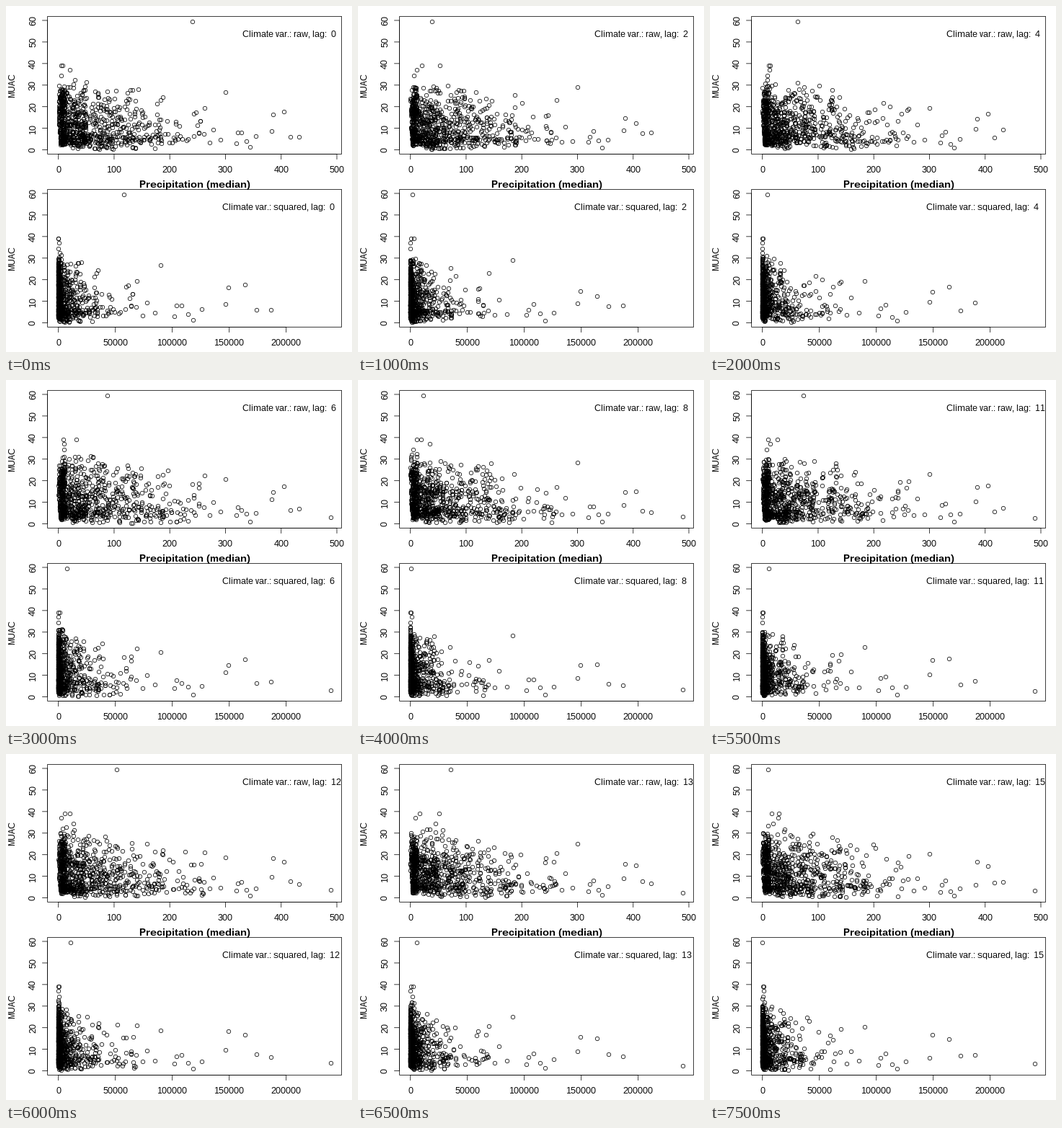
Animation of 480 by 480 pixels, one loop 8000 ms. Source, as a matplotlib script:

```python
import numpy as np
import matplotlib.pyplot as plt
from matplotlib.animation import FuncAnimation
from matplotlib.markers import MarkerStyle
from matplotlib.patches import Rectangle
from matplotlib.transforms import Affine2D

SIZE, DPI = 480, 80
PX = 72 / DPI  # points per pixel
LAGS, STEP = 16, 500
LINE, RING = 0.75, 5.4  # stroke and circle diameter in pixels

plt.rcParams.update({
    "font.family": "Liberation Sans",
    "text.hinting": "native",
    "text.hinting_factor": 1,
})

# Rainfall quantiles of the dense part
RANK = [0, 0.33, 0.63, 0.79, 0.91, 0.97, 1]
RAIN = [0, 12, 50, 92, 145, 190, 260]
COUNT = 830

# Wettest months with their usual MUAC
TAIL = np.array([
    (489, 3.1), (432, 7.2), (417, 6.7), (404.5, 16), (386, 15), (383, 9),
    (355, 4.8), (344, 1.2), (337, 3.9), (329, 8), (321.5, 7), (319.5, 3.5),
    (300, 24), (291, 4.8), (278.5, 10), (272, 4), (262, 20), (261, 7),
    (252, 8), (243.5, 16),
])

# The single highest value drifts between these rainfalls
TOP_LAG = [0, 2, 6, 8, 10, 12, 15]
TOP_X = [240, 39, 88, 23, 42, 104, 10]


def cloud(rng):
    x = np.interp(rng.random(COUNT), RANK, RAIN)
    dry = x < 12
    p_low = np.select([dry, x < 50, x < 150], [0.4, 0.56, 0.52], 0.75)
    low = 1.2 + rng.gamma(3.4, 1.5, COUNT)
    high = np.where(dry, rng.normal(18.5, 5.5, COUNT),
                    9 + rng.gamma(2.1, 4.1, COUNT))
    cap = 34 - 0.04 * x - 7 * rng.random(COUNT)
    y = np.where(rng.random(COUNT) < p_low, low, np.clip(high, 8, cap))
    wet = (x > 25) & (rng.random(COUNT) < 0.05)
    y[wet] = rng.uniform(0.4, 2.5, wet.sum())
    # low values keep clear of zero rainfall
    x = np.maximum(x, (13 - y) * 0.38 + 2 * rng.random(COUNT) - 0.3)
    return np.maximum(x, 0.2), y


def pairs(lag):
    rng = np.random.default_rng(100 + lag)
    x, y = cloud(rng)
    tail = TAIL if lag > 5 else TAIL[1:]
    tail_y = tail[:, 1] * np.exp(rng.normal(0, 0.12, len(tail)))
    peak_x = 4 + rng.exponential(14, 4)
    return (np.concatenate([x, tail[:, 0], peak_x,
                            [np.interp(lag, TOP_LAG, TOP_X)]]),
            np.concatenate([y, tail_y, [39, 39, 37, 34.5, 59.5]]))


fig = plt.figure(figsize=(SIZE / DPI, SIZE / DPI), dpi=DPI, facecolor="white")
ax = fig.add_axes([0, 0, 1, 1])
ax.set(xlim=(0, SIZE), ylim=(SIZE, 0))
ax.axis("off")

# Half a pixel of offset centres the circles on whole pixels
MARK = MarkerStyle("o", transform=Affine2D().translate(0.5 / RING, -0.5 / RING))


def label(x, y, s, px=12, **kw):
    return ax.text(x, y, s, fontsize=px * PX, color="black", **kw)


def upright(x, y, s):
    label(x, y, s, rotation=90, rotation_mode="anchor", ha="center")


def line(x, y):
    ax.plot(x, y, color="black", lw=LINE * PX, snap=False,
            solid_capstyle="round")


class Panel:
    LEFT, WIDTH, HEIGHT = 57.6, 408, 191.04

    def __init__(self, top, power, ticks, name, note_x):
        self.top, self.power = top, power
        self.note = f"Climate var.: {name}, lag:  "
        base = top + self.HEIGHT
        ax.add_patch(Rectangle((self.LEFT, top), self.WIDTH, self.HEIGHT,
                               fill=False, ec="black", lw=LINE * PX, snap=False))
        line([self.sx(0), self.sx(ticks[-1])], [base, base])
        for t in ticks:
            x = self.sx(t)
            line([x, x], [base, base + 7.2])
            label(x, top + 217, str(t), ha="center")
        line([self.LEFT] * 2, [self.sy(0), self.sy(60)])
        for t in range(0, 61, 10):
            y = self.sy(t)
            line([self.LEFT - 7.2, self.LEFT], [y, y])
            upright(41, y, str(t))
        upright(12, top + self.HEIGHT / 2, "MUAC")
        self.text = label(note_x, top + 28.6, "")
        self.dots, = ax.plot([], [], ls="none", marker=MARK, ms=RING * PX,
                             mew=LINE * PX, mfc="none", mec="black")

    def sx(self, v):
        return 72.7 + 377.8 * v / 489 ** self.power

    def sy(self, v):
        return self.top + 185.16 - 2.993 * v

    def show(self, lag, x, y):
        self.dots.set_data(np.floor(self.sx(x ** self.power)),
                           np.floor(self.sy(y)))
        self.text.set_text(self.note + str(lag))


panels = [Panel(14.4, 1, range(0, 501, 100), "raw", 327.5),
          Panel(254.4, 2, range(0, 200001, 50000), "squared", 300)]
label(261.6, 252, "Precipitation (median)", 14, weight="bold", ha="center")


def update(lag):
    x, y = pairs(lag)
    for p in panels:
        p.show(lag, x, y)
    return []


anim = FuncAnimation(fig, update, frames=LAGS, interval=STEP,
                     repeat=True, repeat_delay=0, blit=False)
plt.show()
```
